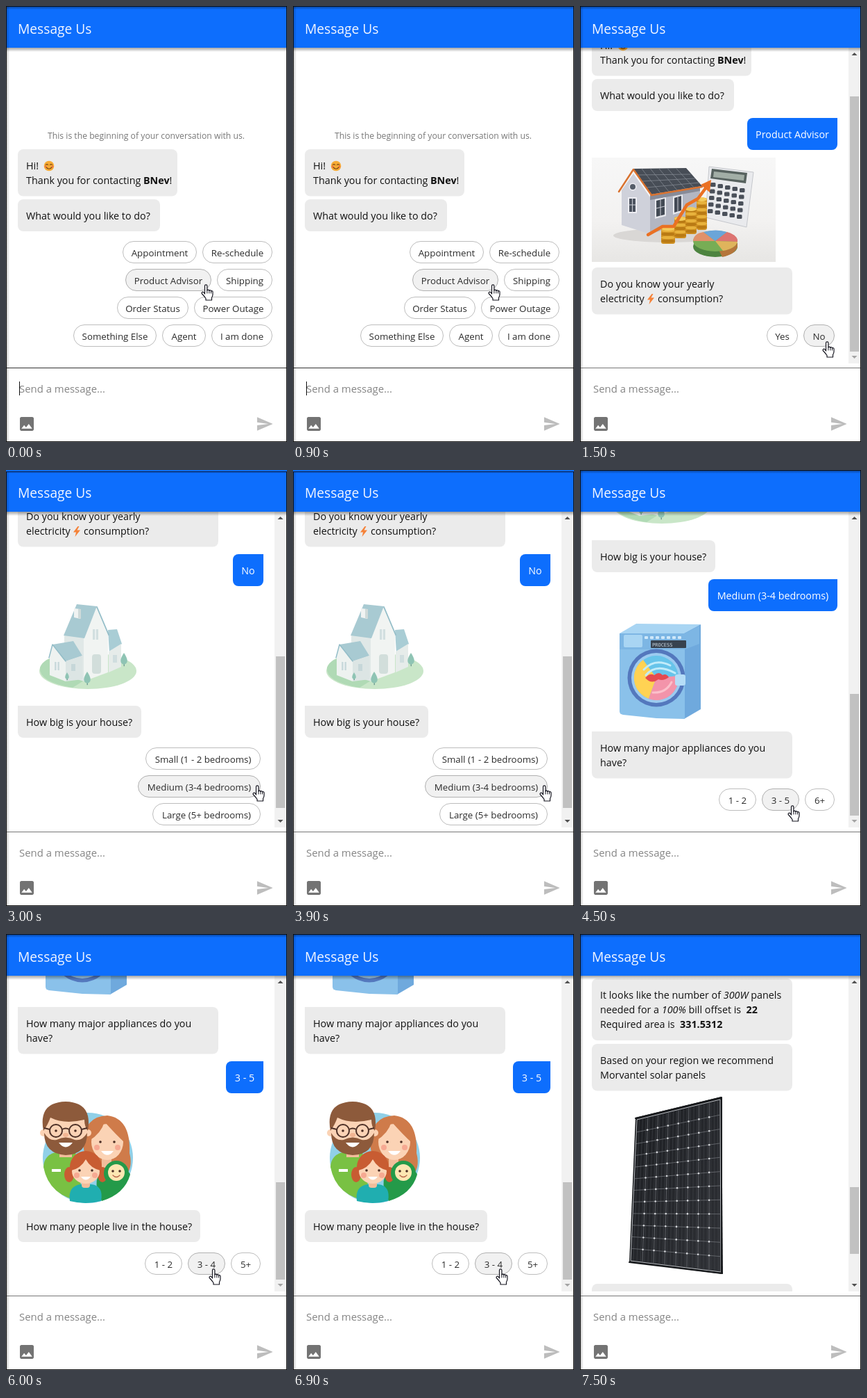
Animation of 405x627 px, one loop 8000 ms. Source, as an HTML page:

```html
<!DOCTYPE html>
<html lang="en">
<head>
<meta charset="utf-8">
<title>Chat conversation</title>
<style>
  html, body { margin: 0; width: 100%; height: 100%; overflow: hidden; background: #fff; }
  svg { display: block; width: 100vw; height: 100vh; }
  text { font: 14.3px "Open Sans", "Noto Sans", sans-serif; fill: #111; white-space: pre; }
  .chip text { font-size: 13.3px; fill: #2b2b2b; text-anchor: middle; }
  .chip rect { fill: #fff; stroke: #bdbdbd; }
  .chip.hover rect { fill: #f1f1f1; stroke: #b0b0b0; }
  .reply text { fill: #fff; font-weight: 500; text-anchor: middle; }
  .note { font-size: 12.2px; fill: #777; text-anchor: middle; }
  .title { font-size: 19.2px; fill: #f2f6ff; }
  .hint { font-size: 14.9px; fill: #858585; }
  .bold { font-weight: 700; }
  .italic { font-style: italic; }
  .scene { visibility: hidden; animation: show 8s step-end infinite; }
  .scene.last { animation-name: show-last; }
  @keyframes show { 0% { visibility: visible; } 18.75%, 100% { visibility: hidden; } }
  @keyframes show-last { 0% { visibility: visible; } 6.25%, 100% { visibility: hidden; } }
</style>
</head>
<body>
<svg id="stage" viewBox="0 0 405 627" preserveAspectRatio="none"></svg>
<script>
const BLUE = '#0d6efd';

// Basic shapes
const poly = (points, fill, extra = '') => `<polygon points="${points}" fill="${fill}" ${extra}/>`;
const path = (d, fill, extra = '') => `<path d="${d}" fill="${fill}" ${extra}/>`;
const line = (d, color, width = 1) => path(d, 'none', `stroke="${color}" stroke-width="${width}" stroke-linecap="round" stroke-linejoin="round"`);
const rect = (x, y, w, h, fill, rx = 0) => `<rect x="${x}" y="${y}" width="${w}" height="${h}" rx="${rx}" fill="${fill}"/>`;
const oval = (x, y, rx, ry, fill) => `<ellipse cx="${x}" cy="${y}" rx="${rx}" ry="${ry}" fill="${fill}"/>`;
const dot = (x, y, r, fill) => oval(x, y, r, r, fill);
const text = (x, y, content, cls = '') => `<text x="${x}" y="${y}" class="${cls}">${content}</text>`;
const shift = (dy, content) => `<g transform="translate(0 ${dy})">${content}</g>`;
const repeat = (n, draw) => Array.from({ length: n }, (_, i) => draw(i)).join('');
const bold = s => `<tspan class="bold">${s}</tspan>`;
const italic = s => `<tspan class="italic">${s}</tspan>`;

// Rounded box whose top corners may be square
const box = (x, y, right, h, fill, topLeft = 8, topRight = 8) => {
  const arc = (r, dx, dy) => `a${r} ${r} 0 0 1 ${dx * r} ${dy * r}`;
  return path(`M${x + topLeft} ${y}H${right - topRight}${arc(topRight, 1, 1)}V${y + h - 8}${arc(8, -1, 1)}H${x + 8}${arc(8, -1, -1)}V${y + topLeft}${arc(topLeft, 1, -1)}z`, fill);
};

// Chat parts
const bubble = (y, right, lines, topLeft = 8) =>
  box(17, y, right, lines.length * 21.5 + 24.5, '#ebebeb', topLeft) +
  lines.map((s, i) => text(29, y + 29 + i * 21, s)).join('');

const reply = (x, y, label) =>
  `<g class="reply">${box(x, y, 371, 46, BLUE, 8, 0)}${text((x + 371) / 2, y + 29, label)}</g>`;

const chip = (x, right, y, label, hover = false) =>
  `<g class="chip ${hover ? 'hover' : ''}">
    <rect x="${x + .5}" y="${y + .5}" width="${right - x - 1}" height="31" rx="15.5"/>
    ${text((x + right) / 2, y + 22, label)}</g>`;

const cursor = (x, y) => `<g transform="translate(${x} ${y})">` +
  path('M5.5 14V2.6a1.7 1.7 0 0 1 3.4 0V9a1.6 1.6 0 0 1 3 .3a1.5 1.5 0 0 1 2.7.7a1.4 1.4 0 0 1 2.4 1V15q0 2-1.5 4.5v3.5H7V20.5Q4.5 17 1.2 13.5a1.6 1.6 0 0 1 2.6-1.8z',
    '#fff', 'stroke="#15151f" stroke-width="1.2" stroke-linejoin="round"') +
  line('M8.9 9v4M11.9 9.5v3.5M14.6 10v3', '#15151f') + '</g>';

const scrollbar = (top, bottom, atEnd) =>
  rect(387, 60, 17, 454, '#f1f1f1') + rect(389, top, 13, bottom - top, '#c1c1c1') +
  poly('391.5,71 395.5,67 399.5,71', '#505050') +
  poly('391.5,503 395.5,507 399.5,503', atEnd ? '#a3a3a3' : '#505050');

// Pictures
const smiley = dot(62, 230, 7.3, '#f6ab35') +
  line('M57.5 228.5q1.5-2 3 0M63.5 228.5q1.5-2 3 0M58 232q4 4.5 8 0', '#7a4514', 1.2) +
  dot(57, 231, 1.3, '#ee6c4d') + dot(67, 231, 1.3, '#ee6c4d');

const bolt = poly('103.5,414 97,422.5 101,422.5 99.5,429 107,419.5 102.5,419.5 105.5,414', '#f58238');

const coins = (x, top, bottom, w) => rect(x, top, w, bottom - top, '#cf9022', 3) +
  repeat(Math.floor((bottom - top) / 5), i => oval(x + w / 2, bottom - 4 - i * 5, w / 2, 2.6, i % 2 ? '#e8b23c' : '#b97a14')) +
  oval(x + w / 2, top + 2, w / 2, 3, '#f4cc5c');

const savings =
  rect(17, 218, 265, 150, 'url(#studio)') +
  oval(128, 330, 80, 10, '#d9d7d5') +
  poly('60,265 77,241 101,275 101,328 60,315', '#cfd1da') +
  poly('101,272 173,261 173,305 101,328', '#b3b6c2') +
  poly('101,272 173,261 173,266 101,279', '#878b98') +
  poly('77,234 153,233 176,259 103,271', '#474d56') +
  repeat(5, i => line(`M${89 + i * 12.5} 234l${27 - i * .3} ${35 - i * 1.8}`, '#8a9099', .7)) +
  repeat(3, i => line(`M${83 + i * 6.5} ${243 + i * 9}l76-${1 + i * 3}`, '#8a9099', .7)) +
  line('M56 267L77 235L103 272L176 260', '#d9722f', 2.5) +
  dot(76, 260, 5.5, '#ededf2') + dot(76, 260, 4, '#555d69') +
  rect(69, 275, 13, 23, '#ededf2') + rect(71, 277, 9, 19, '#4b525e') +
  poly('108,278 124,275 124,302 108,306', '#e6e7ec') + poly('110,280 122,277 122,300 110,303', '#424954') +
  poly('134,274 148,271 148,296 134,300', '#e6e7ec') + poly('136,276 146,273 146,294 136,297', '#424954') +
  line('M75.5 277v19M116 278v24M110 291l12-3M71 286h9M141 275v21', '#ccced6') +
  poly('186,231 250,239 240,318 181,304', '#e9eaed', 'stroke="#c5c7cc"') +
  poly('190,234 241,240 239,255 188,248', '#57625f') + poly('193,238 237,243 236,251 192,246', '#a2aea6') +
  repeat(25, i => {
    const col = i % 5, row = Math.floor(i / 5);
    return rect(188 + col * 10.5 - row, 254 + row * 9.5 + col * 2, 7.5, 6, '#4a505a', 1.5);
  }) +
  coins(117, 318, 342, 20) + coins(136, 304, 334, 17) + coins(152, 290, 328, 16) + coins(168, 276, 322, 15) +
  line('M98 329L119 317L135 317L154 286L170 277L184 258', '#ea7123', 4.5) +
  poly('174,257 189,250 187,268', '#ea7123') +
  oval(195, 346, 32, 15, '#4d8440') + path('M195 341L227 341V346Q224 357 205 361z', '#b5763c') +
  oval(195, 338, 32, 15, '#77ad55') +
  path('M195 338L163 338Q164 327 178 325z', '#e0916a') +
  path('M195 338L178 325Q196 320 212 325z', '#6ba5d8') +
  path('M195 338L212 325Q228 330 227 339z', '#dd7471') +
  path('M195 338L227 339Q224 349 206 352z', '#dfb45c');

const tree = (x, y, s) => rect(x - .5, y, 1.5, 6 * s, '#739f94') + path(`M${x} ${y - 10 * s}q${8 * s} ${12 * s} 0 ${14 * s}q-${8 * s}-${2 * s} 0-${14 * s}z`, '#8fc4b4');

const cottage =
  oval(118, 289, 70, 26, '#c9e6c8') +
  path('M49 284Q54 270 82 266L112 303L96 313Q47 305 49 284z', '#b0dab5') +
  poly('147,230 160,229 167,250 149,263', '#a9cdd5') +
  poly('148,261 166,250 166,283 148,291', '#e6ecea') +
  poly('84,237 113,241 113,304 84,296', '#e0e8e7') +
  poly('131,197 147,236 147,291 112,304 112,241', '#f1f4f2') +
  poly('102,193 131,196 113,242 83,238', '#a8cad2') +
  line('M131 197L148 237', '#93bdc8', 1.8) +
  poly('98,199 107,200 107,214 98,212', '#f0f3f2') + poly('104,200 108,200 108,214 104,213', '#cfdad9') +
  poly('67,251 97,246 110,267 86,275', '#a8cad2') +
  poly('67,252 86,276 86,304 63,295 63,269', '#eef2f0') +
  poly('86,275 110,267 110,301 86,304', '#dce5e4') +
  line('M62 270L67 251L86 275', '#93bdc8', 1.5) +
  rect(125, 229, 8, 15, '#d2dfe0') + rect(124, 265, 13, 28, '#d2dedb', 4) +
  rect(70, 276, 7, 12, '#cddcde') + rect(94, 279, 6, 10, '#c6d7d9') +
  rect(154, 266, 6, 11, '#d0dedf') + line('M129 229v15M73.5 276v12', '#fff') +
  tree(117, 302, 1.2) + tree(170, 275, 1.2) + tree(88, 298, .7);

const washer =
  poly('57,235 81,221 174,222 151,235', '#a9d5f3') +
  poly('150,235 174,222 174,344 150,358', '#6fa9dd') +
  path('M57 235H151V358L110 357L62 352Q57 351 57 347z', '#8ac1ea') +
  poly('57,235 151,235 172,224 172,250 151,258 57,258', '#7db6e4') +
  rect(63, 237, 27, 18, '#a9d5f3', 2) +
  repeat(7, i => rect(93 + i * 8, 239, 5, 4, '#cfe8fa', 1)) +
  rect(102, 245, 51, 11, '#37424f', 1) +
  `<text x="104" y="253.5" style="font:7px 'DejaVu Sans Mono',monospace;fill:#c9d5df">PROCESS</text>` +
  dot(110, 299, 41.5, '#5478bd') + dot(110, 299, 36, '#9ccbf0') + dot(110, 299, 32, '#67c4ea') +
  path('M110 299L91 273A32 32 0 0 0 99 329z', '#ffd253') +
  path('M110 299L142 296A32 32 0 0 1 99 329z', '#f394aa') +
  line('M92 287Q108 270 130 281M95 295Q110 277 137 292', '#c2ecfa', 3) +
  line('M105 320Q124 321 132 305', '#fbc0cb', 3) +
  path('M94 299q7-8 13-4q7-6 12 0q5-3 9 3q-8 6-15 3q-10 8-19-2z', '#e54b50') +
  rect(137, 294, 15, 16, '#b5ddf7', 3);

const smile = (x, y, w) => path(`M${x - w} ${y}H${x + w}Q${x} ${y + w * 1.3} ${x - w} ${y}z`, '#fff');
const eyes = (x, y, gap) => dot(x - gap, y, 1.8, '#4a2c22') + dot(x + gap, y, 1.8, '#4a2c22');
const blush = (x, y, gap) => dot(x - gap, y, 4, '#f6a992') + dot(x + gap, y, 4, '#f6a992');
const SKIN = '#fbd3b5';

const family =
  dot(118, 322, 65, '#90d0e8') +
  path('M111 303Q112 262 146 261Q180 265 178 315Q184 338 170 349H119z', '#cf7b4a') +
  path('M138 384Q120 350 145 335Q178 338 179 346Q171 374 138 384z', '#249a49') +
  rect(138, 312, 14, 24, '#f2bd9b') + oval(146, 299, 23, 26, SKIN) +
  path('M120 297Q137 287 142 270Q158 288 171 300Q175 265 145 264Q117 266 120 297z', '#cf7b4a') +
  eyes(146, 299, 10) + blush(146, 307, 15) + smile(146, 312, 9) +
  path('M54 335Q55 316 76 313H100L112 385Q62 378 54 335z', '#79c143') + rect(66, 338, 13, 4, '#fff') +
  rect(77, 303, 18, 18, '#f2bd9b') + dot(54, 286, 5, SKIN) + dot(118, 286, 5, SKIN) +
  rect(56, 256, 60, 49, SKIN, 23) +
  path('M54 283Q46 242 86 241Q125 242 118 283Q113 277 113 267Q84 274 64 264Q60 275 54 283z', '#8d5a3b') +
  path('M55 286Q62 298 73 296Q86 289 99 296Q110 298 117 286Q117 317 86 318Q55 316 55 286z', '#8d5a3b') +
  smile(86, 300, 10) + eyes(86, 283, 14) + oval(86, 289, 4, 3, '#f2b592') +
  `<g fill="none" stroke="#4c3027" stroke-width="2"><circle cx="72" cy="283" r="9"/><circle cx="100" cy="283" r="9"/><path d="M81 281q5-3 10 0M63 281l-8-2M109 281l8-2"/></g>` +
  oval(91, 346, 7, 11, '#c85c32') + oval(139, 346, 7, 11, '#c85c32') +
  path('M92 384Q89 363 107 360H123Q141 362 137 384Q115 390 92 384z', '#20aeb0') +
  rect(109, 352, 12, 13, '#f2bd9b', 4) + dot(115, 335, 23, '#c85c32') + oval(115, 341, 20, 18, SKIN) +
  path('M94 340Q108 337 115 324Q122 337 136 340Q137 313 115 313Q94 313 94 340z', '#c85c32') +
  eyes(115, 340, 9) + blush(115, 347, 13) + smile(115, 349, 7) +
  dot(159, 344, 18, '#249a49') + dot(159, 343, 12, '#fce7b2') +
  eyes(159, 341, 5) + line('M154 347q5 5 10 0', '#b7664c', 1.3);

// Point inside the tilted panel, u across and v down
const panelPoint = (u, v) => {
  const left = [83 - 9 * v, 268 + 201 * v], right = [201 + v, 240 + 244 * v];
  return left.map((a, i) => (a + (right[i] - a) * u).toFixed(1));
};
const panelLine = (u1, v1, u2, v2, color, width) => line(`M${panelPoint(u1, v1)}L${panelPoint(u2, v2)}`, color, width);
const solarPanel =
  poly('80,264 204,234 206,489 71,472', '#17191c') +
  poly('82,267 202,238 203,486 73,470', 'url(#glass)', 'stroke="#b9bcc0"') +
  repeat(24, i => panelLine((i + .5) / 24, 0, (i + .5) / 24, 1, '#45484d', .6)) +
  repeat(7, i => panelLine((i + 1) / 8, 0, (i + 1) / 8, 1, '#777a80', .7)) +
  repeat(11, i => panelLine(0, (i + 1) / 12, 1, (i + 1) / 12, '#777a80', .7)) +
  repeat(77, i => dot(...panelPoint((i % 7 + 1) / 8, (Math.floor(i / 7) + 1) / 12), 1.3, '#d9dbde')) +
  line('M80 265L204 235V488L71 472', '#17191c', 2);

// Conversation turns, each placed where it first appears
const greeting = bubble(206, 247, ['Hi!', `Thank you for contacting ${bold('BNev')}!`]) + smiley +
  bubble(278, 222, ['What would you like to do?']);
const usage = savings + bubble(376, 306, ['Do you know your yearly', 'electricity<tspan x="112">consumption?</tspan>']) + bolt;
const size = cottage + bubble(339, 195, ['How big is your house?'], 0);
const appliances = washer + bubble(376, 306, ['How many major appliances do you', 'have?'], 0);
const people = family + bubble(397, 280, ['How many people live in the house?']);

const scenes = [
  text(202, 191, 'This is the beginning of your conversation with us.', 'note') + greeting +
    chip(168, 275, 338, 'Appointment') + chip(283, 384, 338, 'Re-schedule') +
    chip(172, 296, 378, 'Product Advisor', true) + chip(304, 384, 378, 'Shipping') +
    chip(160, 263, 418, 'Order Status') + chip(271, 384, 418, 'Power Outage') +
    chip(97, 217, 458, 'Something Else') + chip(225, 288, 458, 'Agent') + chip(296, 384, 458, 'I am done') +
    cursor(281, 400),
  shift(-173, greeting) + reply(241, 161, 'Product Advisor') + usage +
    chip(269, 314, 458, 'Yes') + chip(322, 367, 458, 'No', true) +
    scrollbar(130, 497, true) + cursor(349, 482),
  shift(-333, usage) + reply(327, 121, 'No') + size +
    chip(201, 367, 399, 'Small (1 - 2 bedrooms)') + chip(190, 367, 439, 'Medium (3-4 bedrooms)', true) +
    chip(211, 367, 479, 'Large (5+ bedrooms)') +
    scrollbar(268, 486, false) + cursor(355, 453),
  shift(-238, size) + reply(185, 157, 'Medium (3-4 bedrooms)') + appliances +
    chip(200, 254, 458, '1 - 2') + chip(262, 316, 458, '3 - 5', true) + chip(324, 367, 458, '6+') +
    scrollbar(322, 497, true) + cursor(299, 482),
  shift(-271, appliances) + reply(317, 183, '3 - 5') + people +
    chip(200, 254, 458, '1 - 2') + chip(262, 316, 458, '3 - 4', true) + chip(324, 367, 458, '5+') +
    scrollbar(357, 497, true) + cursor(292, 481),
  bubble(64, 306, [
    `It looks like the number of ${italic('300W')} panels`,
    `needed for a ${italic('100%')} bill offset is&#160; ${bold('22')}`,
    `Required area is&#160; ${bold('331.5312')}`]) +
    bubble(158, 306, ['Based on your region we recommend', 'Morvantel solar panels']) +
    solarPanel + bubble(503, 306, ['']) + scrollbar(364, 460, false)
];

const defs = `<defs>
  <clipPath id="chat"><rect x="1" y="60" width="403" height="454"/></clipPath>
  <linearGradient id="studio" x2="0" y2="1"><stop stop-color="#f7f7f7"/><stop offset=".6" stop-color="#f3f2f1"/><stop offset="1" stop-color="#e7e6e4"/></linearGradient>
  <linearGradient id="glass" y2="1"><stop stop-color="#1b1d21"/><stop offset="1" stop-color="#2f3136"/></linearGradient>
  <linearGradient id="shade" x2="0" y2="1"><stop stop-color="#000" stop-opacity=".35"/><stop offset="1" stop-color="#000" stop-opacity="0"/></linearGradient>
  <linearGradient id="edge"><stop stop-color="#000" stop-opacity=".2"/><stop offset="1" stop-color="#000" stop-opacity="0"/></linearGradient>
</defs>`;

const frame =
  rect(1, 60, 403, 6, 'url(#shade)') + rect(1, 1, 403, 59, BLUE) + text(17, 40, 'Message Us', 'title') +
  rect(1, 1, 403, 4, 'url(#shade)') + rect(1, 1, 4, 625, 'url(#edge)') +
  rect(1, 520, 403, 1, '#777') + text(19, 556, 'Send a message...', 'hint') +
  path('M21 19V5c0-1.1-.9-2-2-2H5c-1.1 0-2 .9-2 2v14c0 1.1.9 2 2 2h14c1.1 0 2-.9 2-2zM8.5 13.5l2.5 3.01L14.5 12l4.5 6H5z', '#737373', 'transform="translate(16.7 587.7) scale(1.11)"') +
  path('M2 21L23 12 2 3v7l15 2-15 2z', '#bdbdbd', 'transform="translate(359.8 588) scale(1.08)"') +
  '<rect x=".5" y=".5" width="404" height="626" fill="none" stroke="#111"/>';

const caret = rect(1, 520, 403, 1, '#333') + rect(19, 540, 1, 20, '#111');
const topEdge = rect(0, 0, 405, 2, BLUE) + rect(0, 2, 405, 1, '#0b1e45');

const wrap = (content, i) => `<g class="scene ${i === 5 ? 'last' : ''}" style="animation-delay:${i * 1.5 - 8}s">${content}</g>`;

document.getElementById('stage').innerHTML = defs + rect(0, 0, 405, 627, '#fff') +
  `<g clip-path="url(#chat)">${scenes.map(wrap).join('')}</g>` + frame + wrap(caret, 0) + wrap(topEdge, 2);
</script>
</body>
</html>
```
